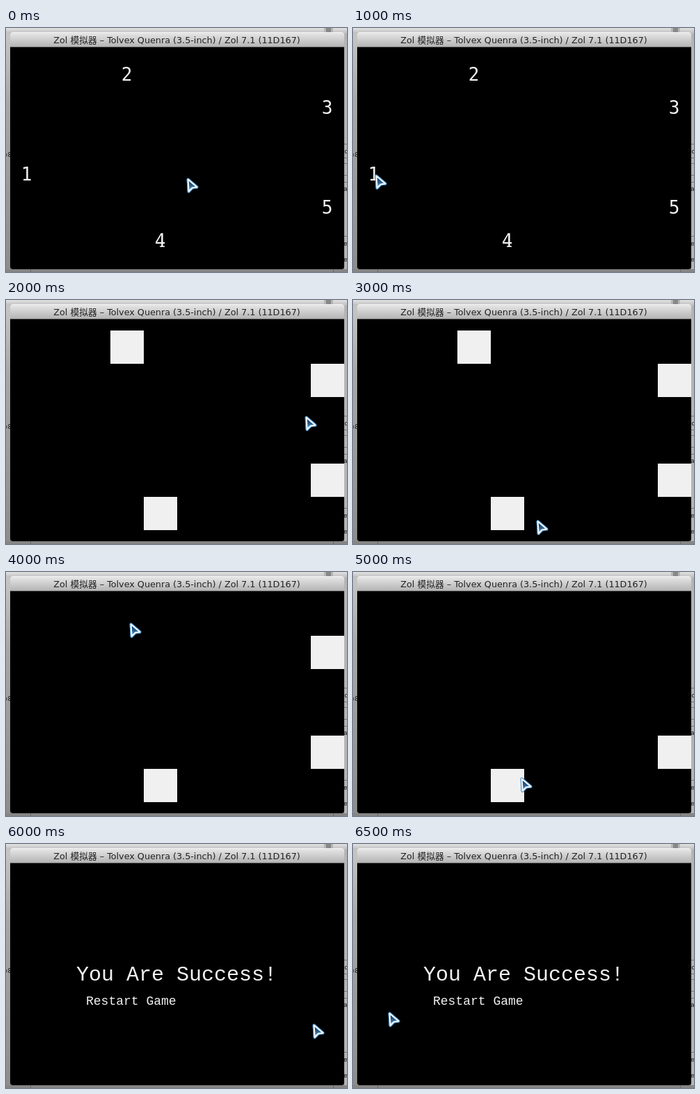
Write an HTML page that moves like this. It is 490x352 px and loops after 7000 ms.

```html
<!DOCTYPE html>
<html lang="zh">
<head>
<meta charset="utf-8">
<title>Number memory game</title>
<style>
  html, body { margin: 0; width: 100%; height: 100%; overflow: hidden; background: #bbb; }
  svg { display: block; width: 490px; height: 352px; }
  .title { font: 12.75px "DejaVu Sans", "Noto Sans CJK SC", sans-serif; fill: #222; text-anchor: middle; }
  .digit { font: 26px "DejaVu Sans Mono", monospace; fill: #f2f2f2; text-anchor: middle; }
  .result { font-family: "Liberation Mono", monospace; fill: #f2f2f2; }
  .scrap { font: 9px "DejaVu Sans Mono", monospace; fill: #111; }
</style>
</head>
<body>
<svg viewBox="0 0 490 352">
  <defs>
    <linearGradient id="bar" x2="0" y2="1">
      <stop stop-color="#e9e9e9"/><stop offset="1" stop-color="#b2b2b2"/>
    </linearGradient>
    <linearGradient id="top" x2="0" y2="1">
      <stop stop-color="#e2e2e2"/><stop offset="1" stop-color="#bcbcbc"/>
    </linearGradient>
    <linearGradient id="side" x2="0" y2="1">
      <stop stop-color="#c8c8c8"/><stop offset=".3" stop-color="#a8a8a8"/><stop offset="1" stop-color="#8c8c8c"/>
    </linearGradient>
    <linearGradient id="blue" x2="0" y2="1">
      <stop stop-color="#12304f"/><stop offset=".55" stop-color="#2d618f"/><stop offset="1" stop-color="#78b5e0"/>
    </linearGradient>
  </defs>

  <!-- desktop around the simulator window -->
  <rect width="490" height="352" fill="url(#side)"/>
  <rect width="490" height="8" fill="url(#top)"/>
  <rect x="457" width="13" height="7" fill="#b5b5b5"/>
  <rect x="460" width="7" height="6" fill="#888"/>
  <rect x="486" y="8" width="4" height="344" fill="#b4b4b4"/>
  <path d="M486 167.5h4M486 187.5h4M486 195.5h4M486 212.5h4M486 222.5h4M486 300.5h4" stroke="#777"/>
  <rect y="348" width="490" height="4" fill="#858585"/>
  <path d="M35.5 348v4M470.5 348v4" stroke="#666"/>
  <g class="scrap">
    <text x="-3" y="186">×8</text>
    <text x="486" y="181">c</text>
    <text x="485" y="235">a</text>
    <text x="485" y="314">e</text>
    <text x="485" y="337">e</text>
  </g>

  <!-- window -->
  <path d="M6 28V10q0-4 4-4H482q4 0 4 4V28Z" fill="url(#bar)"/>
  <path d="M9 6.5H483" stroke="#f4f4f4"/>
  <path d="M6 27.5H486" stroke="#555"/>
  <path d="M6 28H486V344q0 4-4 4H10q-4 0-4-4Z"/>
  <text class="title" x="245.5" y="22">Zol 模拟器 – Tolvex Quenra (3.5-inch) / Zol 7.1 (11D167)</text>

  <g id="cells"></g>
  <g id="result" class="result">
    <text x="101" y="197" font-size="30">You Are Success!</text>
    <text x="115" y="232" font-size="18">Restart Game</text>
  </g>
  <g id="cursor" stroke-linejoin="round">
    <path id="arrow" d="M2.6 2.4L15.4 13.6L8.6 14.6L3.6 19.8Z" fill="none" stroke="#4f98d0" stroke-width="4"/>
    <use href="#arrow" style="stroke:#fff"/>
    <path d="M2.6 2.4L15.4 13.6L8.6 14.6L3.6 19.8Z" fill="url(#blue)" stroke="#f4faff" stroke-width="2"/>
  </g>
</svg>
<script>
const STEP = 500;
const COVER_STEP = 3;

// Top-left corner of each cell and the step at which it is clicked.
const cells = [
  { x: 6, y: 188, cleared: 3 },
  { x: 150, y: 44, cleared: 8 },
  { x: 438, y: 92, cleared: 10 },
  { x: 198, y: 284, cleared: 11 },
  { x: 438, y: 236, cleared: 12 },
];

const pointer = [
  [259, 216], [82, 214], [31, 211], [157, 283], [429, 167], [458, 113], [263, 317],
  [218, 127], [177, 73], [449, 118], [240, 296], [431, 255], [440, 259], [50, 242],
];

const byId = id => document.getElementById(id);
const show = (node, visible) => node.setAttribute("visibility", visible ? "visible" : "hidden");

function add(parent, tag, attributes, text = "") {
  const node = document.createElementNS("http://www.w3.org/2000/svg", tag);
  for (const name in attributes) node.setAttribute(name, attributes[name]);
  node.textContent = text;
  return parent.appendChild(node);
}

cells.forEach((cell, i) => {
  const { x, y } = cell;
  cell.number = add(byId("cells"), "g", {});
  add(cell.number, "text", { class: "digit", x: x + 23.5, y: y + 32 }, i + 1);
  if (i === 3) add(cell.number, "rect", { x: x + 23, y: y + 30.5, width: 7, height: 1.5, fill: "#f2f2f2" });
  cell.cover = add(byId("cells"), "rect", { x, y, width: 48, height: 48, fill: "#f0f0f0" });
});

function draw(now) {
  const step = Math.floor(now / STEP) % pointer.length;
  for (const { number, cover, cleared } of cells) {
    show(number, step < COVER_STEP);
    show(cover, step >= COVER_STEP && step < cleared);
  }
  show(byId("result"), step >= 12);
  byId("cursor").setAttribute("transform", `translate(${pointer[step]})`);
}

let start;
function frame(now) {
  start ??= now;
  draw(now - start);
  requestAnimationFrame(frame);
}
draw(0);
requestAnimationFrame(frame);
</script>
</body>
</html>
```
